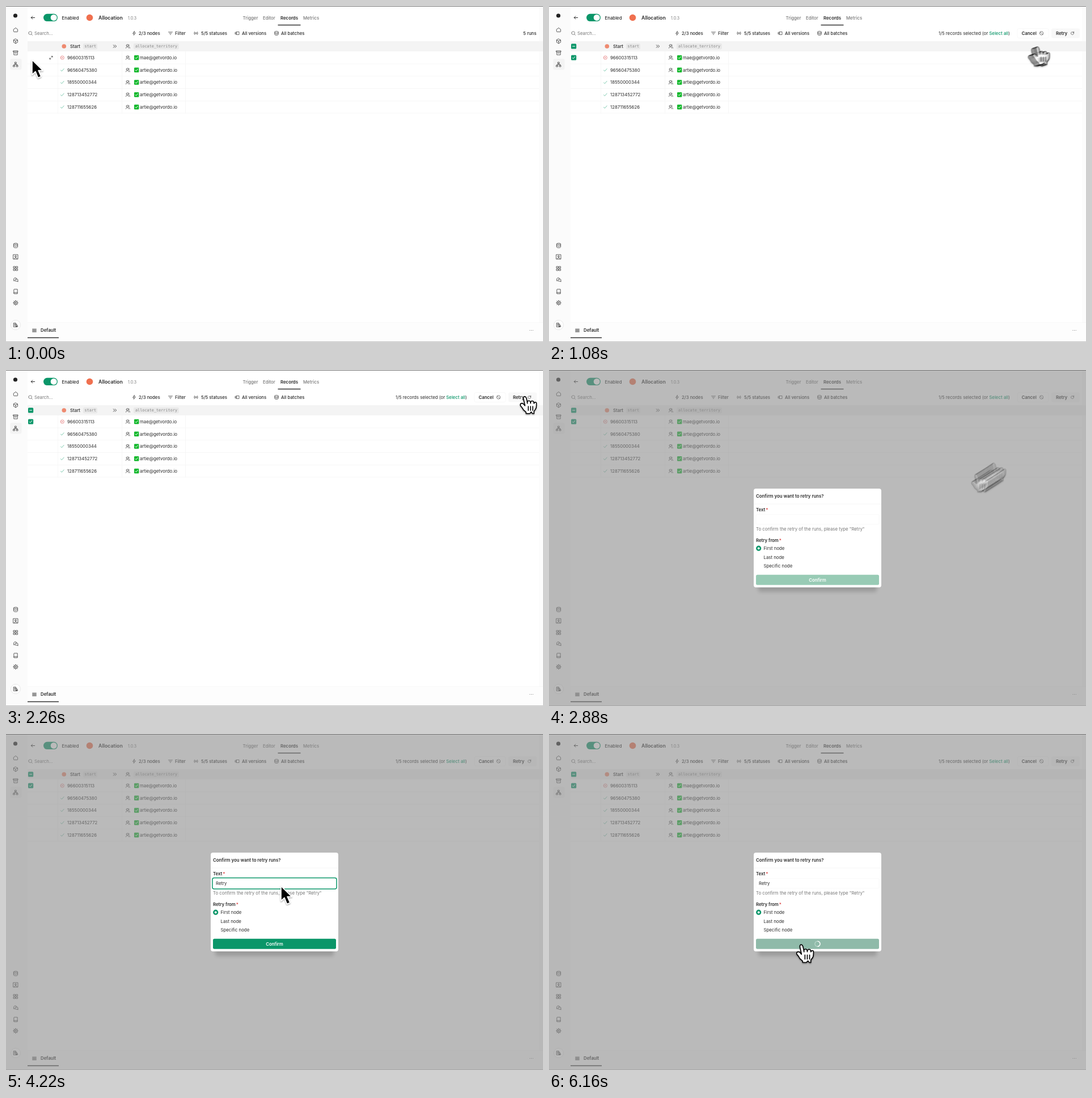
An HTML page for the animation above (6.18 s loop, 947x592 px).

```html
<!DOCTYPE html>
<html lang="en">
<head>
<meta charset="utf-8">
<style>
  html, body { margin: 0; width: 100%; height: 100%; overflow: hidden; background: #fff; }
  svg { display: block; }
  text { font: 400 7.8px Inter, sans-serif; fill: #2b2b2b; white-space: pre; }
  .m { font-weight: 500; }
  .b { font-weight: 600; }
  .grey { fill: #777; }
  .green { fill: #0b9669; }
  .red { fill: #dc3b3b; }
  .code { font: 6.83px "DejaVu Sans Mono", monospace; fill: #858585; }
  .icon { fill: none; stroke-linecap: round; stroke-linejoin: round; }
</style>
</head>
<body>
<svg id="stage" width="947" height="592" viewBox="0 0 947 592"></svg>
<script>
const LOOP = 6180, GREEN = '#0b9669', INK = '#333';
const CLICKS = { check: 420, retry: 2320, field: 3330, confirm: 5380 };
const KEYS = [3480, 3610, 3760, 3900, 4050];
const BLUR_COPIES = 20, SHUTTER = 20;

// Markup helpers; text and icons are centred vertically on y.
const text = (x, y, s, cls = '', attrs = '') =>
  `<text x="${x}" y="${y + 2.85}" class="${cls}" ${attrs}>${s}</text>`;
const rect = (x, y, w, h, fill, r = 0, attrs = '') =>
  `<rect x="${x}" y="${y}" width="${w}" height="${h}" rx="${r}" fill="${fill}" ${attrs}/>`;
const circle = (x, y, r, fill, attrs = '') =>
  `<circle cx="${x}" cy="${y}" r="${r}" fill="${fill}" ${attrs}/>`;
const icon = (x, y, d, size = 9, color = INK, weight = 2) =>
  `<path class="icon" d="${d}" stroke="${color}" stroke-width="${weight}"
    transform="translate(${x - size / 2} ${y - size / 2}) scale(${size / 24})"/>`;
const group = (id, body, attrs = '') => `<g id="${id}" ${attrs}>${body}</g>`;

const ring = (x, y, r) => `M${x - r} ${y}a${r} ${r} 0 1 0 ${2 * r} 0a${r} ${r} 0 1 0 ${-2 * r} 0`;
const box = (x, y, w, h = w) => `M${x} ${y}h${w}v${h}h${-w}z`;
const icons = {
  home: 'M3 10l9-7 9 7v9a2 2 0 0 1-2 2H5a2 2 0 0 1-2-2z',
  cube: 'M12 2l9 5v10l-9 5-9-5V7zM3 7l9 5 9-5M12 12v10',
  archive: box(2, 3, 20, 5) + 'M4 8v13h16V8M9 13h6',
  tree: box(9, 2, 6) + box(2, 16, 6) + box(16, 16, 6) + 'M12 8v4M5 16v-4h14v4',
  data: 'M3 5a9 3 0 0 0 18 0a9 3 0 0 0-18 0v14a9 3 0 0 0 18 0V5M3 12a9 3 0 0 0 18 0',
  user: box(2, 2, 20) + ring(12, 10, 3.5) + 'M6 21c1-7 11-7 12 0',
  grid: box(3, 3, 7) + box(14, 3, 7) + box(3, 14, 7) + box(14, 14, 7),
  chat: 'M8 16H3l1-3a7 7 0 1 1 13-6M13 9h6a3 3 0 0 1 3 3v9l-3-3h-6a3 3 0 0 1-3-3v-3a3 3 0 0 1 3-3z',
  book: 'M4 19V4a2 2 0 0 1 2-2h14v20H6a2 2 0 0 1 0-5h14',
  gear: ring(12, 12, 3) + ring(12, 12, 8) + 'M12 1v3M12 20v3M1 12h3M20 12h3M4 4l2 2M18 18l2 2M20 4l-2 2M6 18l-2 2',
  office: box(3, 3, 10, 18) + 'M13 9h5v12h-5M6 7h4M6 11h4M6 15h4' + ring(19, 18, 3),
  back: 'M21 12H3M10 5l-7 7 7 7',
  search: ring(11, 11, 8) + 'M17 17l5 5',
  bolt: 'M13 2L5 14h6l-1 8 9-12h-7z',
  filter: 'M2 6h20M6 12h12M10 18h4',
  signal: 'M5 5q-5 7 0 14M9 8q-3 4 0 8M19 5q5 7 0 14M15 8q3 4 0 8M12 11v2',
  versions: box(10, 5, 12, 14) + 'M6 6v12M2 8v8',
  batches: 'M3 6a9 4 0 0 0 18 0a9 4 0 0 0-18 0v12a9 4 0 0 0 18 0V6M3 12a9 4 0 0 0 18 0',
  more: 'M4 5l7 7-7 7M13 5l7 7-7 7',
  people: ring(9, 8, 5) + 'M2 21c0-9 14-9 14 0M15 3a5 5 0 0 1 1 9M18 14q4 2 4 7',
  tick: 'M3 13l6 6L21 5',
  fail: ring(12, 12, 10) + 'M9 9l6 6M15 9l-6 6',
  expand: 'M14 4h6v6M20 4l-6 6M10 20H4v-6M4 20l6-6',
  ban: ring(12, 12, 10) + 'M5 5l14 14',
  redo: 'M20 12a8 8 0 1 1-3-6l3 3M20 3v6h-6',
  menu: 'M2 5h20M2 10h20M2 15h20M2 20h20',
  dots: 'M3 12h.1M12 12h.1M21 12h.1'
};

const checkbox = (y, d) => rect(39, y - 4.6, 9.2, 9.2, GREEN, 1.5) + icon(43.6, y, d, 6, '#fff', 4);

function sidebar() {
  const items = { home: 42, cube: 62, archive: 82.5, tree: 103, data: 422, user: 442,
    grid: 462.5, chat: 482.5, book: 503, gear: 523 };
  return rect(0, 0, 38, 592, '#fbfbfb') + rect(7.5, 93, 20, 19.5, '#f3f3f3', 3) +
    circle(16.5, 17, 3.6, '#222') +
    Object.entries(items).map(([name, y]) => icon(17, y, icons[name], 9.5)).join('') +
    circle(17, 562, 8.5, '#fff', 'stroke="#e2e2e2" stroke-width=".8"') + icon(17, 562, icons.office);
}

function toolbar() {
  const tabs = text(417.5, 21, 'Trigger', 'm grey') + text(453, 21, 'Editor', 'm grey') +
    text(484, 21, 'Records', 'b') + text(524, 21, 'Metrics', 'm grey');
  const filters = [['bolt', 226, 234, '2/3 nodes'], ['filter', 290, 298, 'Filter'],
    ['signal', 335, 344, '5/5 statuses'], ['versions', 407.5, 416, 'All versions'],
    ['batches', 477, 485, 'All batches']];
  return icon(47.5, 20.5, icons.back, 8.5, '#222', 2.6) +
    rect(66, 13.7, 25, 13.4, GREEN, 6.7) + circle(84.2, 20.4, 5.5, '#fff') +
    text(98.5, 21, 'Enabled', 'm') + circle(147.5, 20.5, 5.8, '#f0704f') +
    text(163, 21, 'Allocation', 'b', 'style="font-size:8.8px"') +
    text(215, 21.3, '1.0.3', 'grey', 'style="font-size:7px"') +
    tabs + rect(479.5, 32.8, 40, 1.5, '#333') +
    icon(43, 48, icons.search, 8.5, '#555') + text(50, 48, 'Search...', 'grey') +
    filters.map(([name, ix, x, s]) => icon(ix, 48, icons[name], 8.5) + text(x, 48, s, 'm')).join('');
}

function table() {
  const ids = ['96600315113', '96560475380', '18550000344', '128713452772', '128711655626'];
  const row = (id, i) => {
    const y = 91 + i * 21.75;
    return rect(38, y + 10.6, 902, .7, '#f3f3f3') +
      icon(99.3, y, i ? icons.tick : icons.fail, 7.5, i ? '#2fa87e' : '#df5a5a') +
      text(108, y, id) + icon(215, y, icons.people, 8.5) +
      rect(226, y - 4.2, 8.4, 8.4, '#12b82c', 1.2) + icon(230.2, y, icons.tick, 6, '#fff', 4) +
      text(236, y, (i ? 'artie' : 'mae') + '@getvordo.io');
  };
  return rect(38, 62, 909, 18, '#f4f4f4') + circle(102.3, 71, 3.8, '#ee8a70') +
    text(113, 71, 'Start', 'm') + rect(136, 66, 25, 10.5, '#e9e9e9', 2) + text(138.5, 70.5, 'start', 'code') +
    icon(192, 71, icons.more, 8, INK, 2.6) + icon(215, 71, icons.people, 8.5) +
    rect(225, 66, 80, 10.5, '#e9e9e9', 2) + text(228, 70.5, 'allocate_territory', 'code') +
    ids.map(row).join('') + [91, 204, 316].map(x => rect(x, 80, .7, 109, '#f4f4f4')).join('');
}

const footer = rect(38, 558, 909, 34, '#fdfdfd') + rect(38, 557.5, 909, .7, '#f3f3f3') +
  icon(50, 571.5, icons.menu, 8, INK, 2.5) + text(61, 571.5, 'Default', 'b') +
  rect(38, 583.7, 55, 1.5, '#333') + icon(926.5, 571.5, icons.dots, 7, INK, 2.6);

const selection = checkbox(71, 'M4 12h16') + checkbox(91, icons.tick) +
  text(687, 48, '1/5 records selected (or <tspan class="green m">Select all</tspan>)') +
  rect(826, 39.5, 55, 17, '#fff', 3, 'stroke="#f6f6f6" stroke-width=".8"') +
  text(833.5, 48, 'Cancel', 'b') + icon(868.5, 48, icons.ban, 7.5) +
  rect(886, 39.5, 50, 17, '#f8f8f8', 3) + text(894, 48, 'Retry', 'b') + icon(923, 48, icons.redo, 7.5);

const star = ' <tspan class="red" dx="-1">*</tspan>';
const dialog = rect(0, 0, 947, 592, '#8c8c8c', 0, 'opacity=".6"') +
  rect(369, 225, 209, 166, '#000', 4, 'opacity=".16" style="filter:blur(3px)"') +
  rect(361, 209, 225, 174, '#fff', 4) +
  text(365, 222, 'Confirm you want to retry runs?', 'b') + rect(361, 235.7, 225, .7, '#f0f0f0') +
  text(365, 246.5, 'Text' + star, 'b') +
  rect(365, 254.5, 217, 17.5, '#fff', 2, 'stroke="#f6f6f6" stroke-width=".7"') +
  rect(364, 253.4, 219, 19.6, '#fff', 3, `id="focus" stroke="${GREEN}" stroke-width="1.5"`) +
  text(370, 263.5, '', '', 'id="typed"') + rect(0, 259, .8, 9, '#222', 0, 'id="caret"') +
  text(365, 280.5, 'To confirm the retry of the runs, please type "Retry"', 'grey') +
  text(365, 300.5, 'Retry from' + star, 'b') +
  circle(369.7, 314.2, 3.3, '#fff', `stroke="${GREEN}" stroke-width="2.6"`) +
  ['First', 'Last', 'Specific'].map((s, i) => text(378.5, 314.2 + i * 15.7, s + ' node')).join('') +
  rect(365, 360.7, 217, 18, GREEN, 2.5, 'id="button"') +
  text(473.5, 369.7, 'Confirm', 'b', 'id="label" text-anchor="middle" style="fill:#fff"') +
  group('spinner', circle(0, 0, 4.6, 'none', 'stroke="#b9d5ca" stroke-width="1.3"') +
    '<path d="M0-4.6A4.6 4.6 0 0 1 0 4.6" fill="none" stroke="#fff" stroke-width="1.3"/>');

const cursors = `<defs>
  <filter id="shade" x="-50%" y="-50%" width="200%" height="200%">
    <feDropShadow dx="0" dy="1.4" stdDeviation="1.2" flood-opacity=".4"/></filter>
  <path id="arrow" d="M0 0V26L6 20.5 10.5 31.5 15.8 29.2 11.2 18.6H19Z"
    fill="#000" stroke="#fff" stroke-width="1.7" stroke-linejoin="round"/>
  <g id="hand" transform="scale(2.05) translate(-12 -8.5)" stroke="#000" stroke-width=".8"
    stroke-linejoin="round" stroke-linecap="round">
    <path fill="#fff" d="M11.3 20.4c-.3-.4-.6-1.1-1.2-2-.3-.5-1.2-1.5-1.5-1.9-.2-.4-.2-.6-.1-1
      .1-.6.7-1.1 1.4-1.1.5 0 1 .4 1.4.7l1.3 1.5c-.1-.8-.2-1.4-.4-2.2l-.9-3.9c-.1-.5-.1-1.4.3-1.8
      .3-.3.9-.4 1.3-.2.5.3.8 1 .9 1.3.5 1.5.8 3 1 4.8 0-.4-.1-1.1 0-1.5.3-.8 1-1 1.6-.9.8.1 1.2.9 1.2 2.3
      .1-.4.1-1.2.3-1.6.5-.6 1.1-.7 1.7-.5.8.2 1 1 1.1 2.2.3-1.6 2.2-1.5 2.2-.1v1.9c0 1.5-.2 2.6-1 3.5
      0 0-1.1 1.2-1.2 1.8l-.1 1 .1.9s-.8.1-1.2 0c-.4-.1-.9-.8-1-1.1-.2-.3-.5-.3-.7 0-.2.4-.7 1.1-1.1 1.1
      -.7.1-2.1 0-3.1 0 0 0 .2-1-.2-1.4z"/>
    <path fill="none" d="M15.6 17.2v3.6M17.6 17.2v3.6M19.6 17.2v3.6"/>
  </g></defs>`;

const stage = document.getElementById('stage');
stage.innerHTML = cursors + rect(0, 0, 947, 592, '#fff') + rect(940, 0, 7, 592, '#fcfcfc') +
  sidebar() + toolbar() + table() + footer +
  group('idle', text(935.5, 48, '5 runs', 'm', 'text-anchor="end"')) +
  group('hover', icon(79.5, 91, icons.expand, 7.5, INK, 2.4)) +
  group('selected', selection) + group('dialog', dialog) +
  rect(0, 0, 947, 1, '#777') + rect(0, 591.4, 947, .6, '#999') +
  group('pointer', '<use/>'.repeat(BLUR_COPIES), 'filter="url(#shade)"');

const el = id => document.getElementById(id);
const show = (id, on) => el(id).setAttribute('visibility', on ? 'inherit' : 'hidden');
const clamp = v => Math.min(1, Math.max(0, v));

function pointerAt(t) {
  // Critically damped spring from 0 to 1.
  const go = (start, speed = .01) => {
    const u = Math.max(0, t - start) * speed;
    return 1 - (1 + u) * Math.exp(-u);
  };
  const first = go(100, .02), last = go(4480, .012);
  return [46 - 4 * first + 872 * go(640) - 429 * go(2760) - 41 * last,
    95 - 3 * first - 45 * go(940) + 221 * go(2760, .016) + 103.5 * last];
}

function drawPointer(t) {
  const [x0, y0] = pointerAt(t - SHUTTER / 2), [x1, y1] = pointerAt(t + SHUTTER / 2);
  const spread = Math.hypot(x1 - x0, y1 - y0);
  const alpha = spread < 1 ? 1 : Math.max(.13, 1 - spread / 10);
  const shape = (t > 200 && t < 2990) || t > 4780 ? '#hand' : '#arrow';
  const scale = Object.values(CLICKS).reduce((s, c) => s - .16 * Math.exp(-(((t - c) / 50) ** 2)), 1);
  el('pointer').querySelectorAll('use').forEach((copy, i) => {
    const [x, y] = pointerAt(t + SHUTTER * (i / (BLUR_COPIES - 1) - .5));
    copy.setAttribute('href', shape);
    copy.setAttribute('opacity', alpha);
    copy.setAttribute('visibility', alpha < 1 || i === 0 ? 'visible' : 'hidden');
    copy.setAttribute('transform', `translate(${x} ${y}) scale(${scale})`);
  });
}

function render(t) {
  const selected = t >= CLICKS.check, loading = t >= CLICKS.confirm + 50;
  const focused = t >= CLICKS.field && !loading;
  show('idle', !selected);
  show('selected', selected);
  show('hover', t < 680);
  const fade = clamp((t - CLICKS.retry - 40) / 130);
  el('dialog').setAttribute('opacity', fade);
  show('dialog', fade > 0);

  const count = KEYS.filter(k => t >= k).length, typing = t > CLICKS.field && t < 4150;
  el('typed').textContent = 'Retry'.slice(0, count);
  show('focus', focused);
  show('caret', focused && (typing || (t - 3700) % 1000 < 500));
  el('caret').setAttribute('x', 370.3 + (count ? el('typed').getComputedTextLength() : 0));

  const ready = count === KEYS.length;
  el('button').setAttribute('fill',
    loading ? '#8fbaa9' : !ready ? '#98cbb5' : t > 4780 ? '#047754' : GREEN);
  show('label', !loading);
  show('spinner', loading);
  el('spinner').setAttribute('transform', `translate(473.5 369.7) rotate(${(t - 6160) * .36})`);
  drawPointer(t);
}

const began = performance.now();
(function tick() {
  render((performance.now() - began) % LOOP);
  requestAnimationFrame(tick);
})();
</script>
</body>
</html>
```
